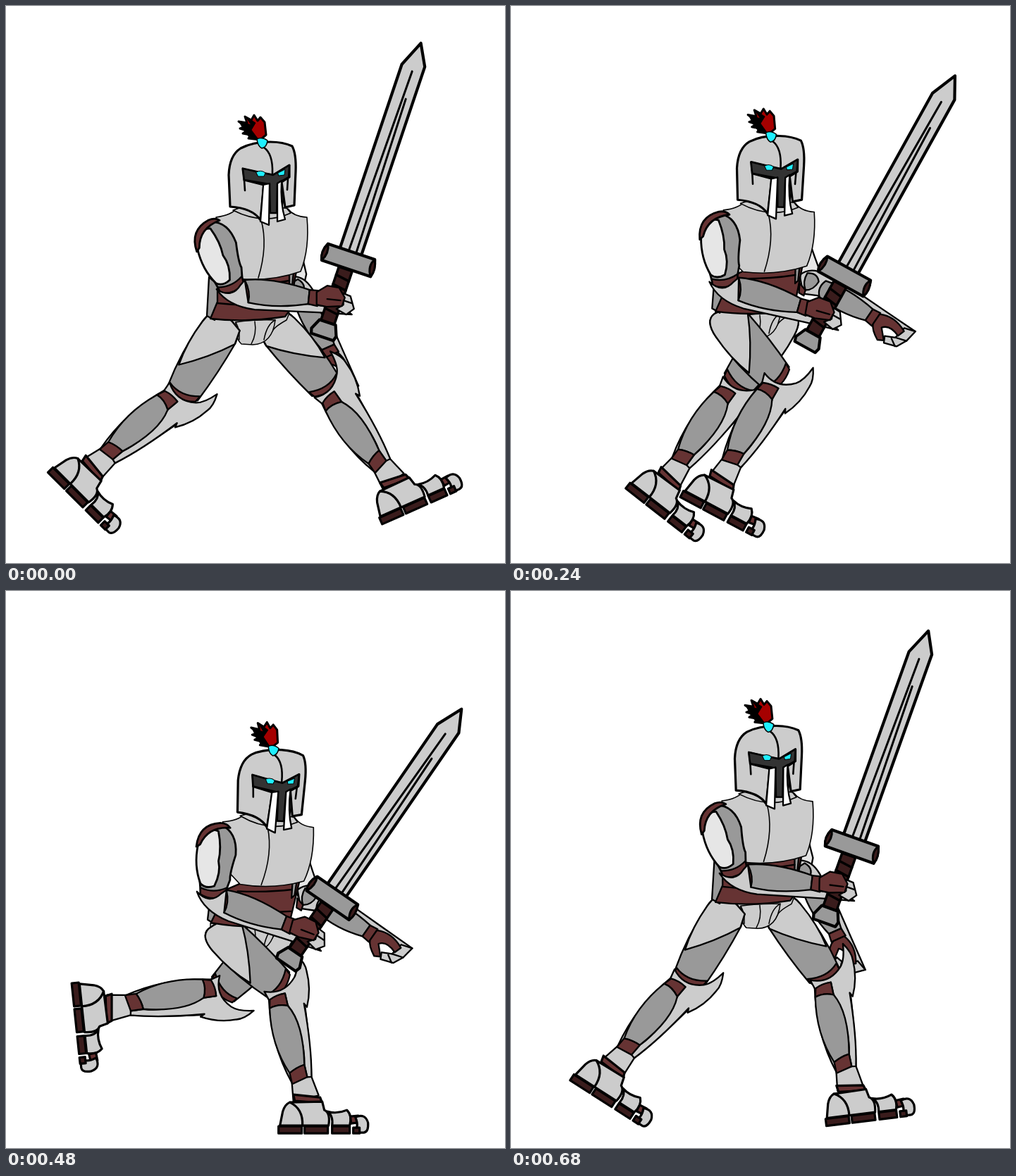
Write an HTML page with a canvas that moves like this. It is 708 px wide and 791 px high and loops after 720 ms.

```html
<!DOCTYPE html>
<html lang="en">
<head>
<meta charset="utf-8">
<title>Running knight</title>
<style>
html, body { margin: 0; width: 100%; height: 100%; overflow: hidden; background: #fff; }
canvas { display: block; }
</style>
</head>
<body>
<canvas id="stage" width="708" height="791"></canvas>
<script>
const ctx = document.getElementById('stage').getContext('2d');
const STEEL = '#ccc', GRAY = '#999', PALE = '#e6e6e6', RED = '#633', DARK = '#3a1c1c', CYAN = '#1fefff';
const THIGH = 115, SHIN = 167, UPPER_ARM = 88, BACK_ARM = 76;

// A shape is [fill, path, line width].
const shape = (fill, d, width = 2.3) => ({ fill, path: new Path2D(d), width });

const thigh = [
  shape(GRAY, 'M-27 8Q-24-19-8-18Q10-14 25-8L29 10Q30 60 25 108Q0 122-22 112Q-31 60-27 8Z'),
  shape(RED, 'M-22 106Q0 116 25 101L23 111Q0 125-21 115Z'),
  shape(STEEL, 'M-27 8Q-24-19-8-18Q10-14 25-8L29 12Q8 46-24 78Q-31 45-27 8Z')
];
const shin = [
  shape(STEEL, 'M-20 10L4 6L28 28Q22 90 14 132L18 160L-19 161L-15 134Q-32 75-20 10Z'),
  shape(STEEL, 'M-24-1Q2 10 22-11Q30-20 32-42Q42-27 41-16Q42 10 30 34L27 28Q24 90 14 132L8 131L8 113Q18 75 4 25L4 8Q-10 8-20 13Z'),
  shape(RED, 'M-19 12Q-8 7 4 8L4 26Q-10 20-22 24Z'),
  shape(GRAY, 'M-22 24Q-10 20 4 26Q20 55 8 113Q-4 114-15 120Q-32 75-22 24Z'),
  shape(RED, 'M-15 120Q-4 114 8 113L8 131L-15 136Z')
];
const foot = [
  shape(RED, 'M-20-12L18-8L21 0L-18-3Z', 3.2),
  shape(STEEL, 'M-25-1L21-2L24 10Q33 14 30 32L-8 32Z', 3.2),
  shape(STEEL, 'M-39 32L-35 12Q-32 2-25-1Q-6 8-7 32Z', 3.2),
  shape(STEEL, 'M35 32Q37 18 28 12Q42 16 56 10Q64 18 60 32Z', 3.2),
  shape(RED, 'M61 19L72 18L70 28L62 29Z', 3.2),
  shape(STEEL, 'M66 42Q74 34 68 20Q82 14 86 28Q87 41 80 42Z', 3.2),
  shape(DARK, 'M-41 33H-8V43H-41ZM-4 33H29V43H-4ZM35 33H60V43H35ZM65 35H74V43H65Z', 3.2)
];
const pelvis = [
  shape(STEEL, 'M290 441L402 436L398 446Q380 456 378 462Q368 480 350 480L334 479Q326 472 326 462Q308 450 290 447Z', 1.5),
  shape(STEEL, 'M326 449Q352 445 382 446Q378 480 350 481L334 480Q325 472 326 449Z', 1.5),
  shape(null, 'M353 448Q356 466 348 480M326 449Q332 460 331 474M382 446Q370 452 366 474', 1.5)
];
const torso = [
  shape(GRAY, 'M288 385L306 400L299 432L296 446L285 440Z'),
  shape(RED, 'M300 400L330 385L412 376L402 433L396 441Q340 450 290 444L300 420Z'),
  shape(GRAY, 'M402 378L408 377L406 398L402 402Z'),
  shape(null, 'M300 422Q350 428 402 421M325 397Q370 396 402 390'),
  shape(STEEL, 'M298 300Q320 297 328 287Q362 304 400 288Q408 299 427 300Q431 345 418 377Q375 392 328 387L310 370Z', 1.6),
  shape(null, 'M362 304Q372 340 358 386', 1.6),
  shape(STEEL, 'M322 290L340 284L398 287L404 294Q365 312 322 290Z', 1.6)
];
const head = [
  shape('#a50000', 'M361 190L369 183L367 165L361 158L357 163L352 155L348 162L339 157L342 166L330 164L340 171L332 174L342 177L336 181L347 183L344 188Z', 3),
  shape('#000', 'M331 164L348 169L340 157L354 166L348 176L357 188L346 187L339 179Z', 1),
  shape('#333', 'M336 231H402L390 294H368Z', 2),
  shape(STEEL, 'M318 285L316 240Q317 212 333 202Q350 193 375 193Q393 193 406 199Q412 210 411 235L409 283L396 286L391 250L402 243L402 226L379 240Q357 236 336 231L338 247L366 254L361 304Q350 287 318 285Z', 3.2),
  shape('#333', 'M336 231Q357 236 379 240L402 226L401 243L385 252L384 294H375L374 253L338 247Z'),
  shape('#fff', 'M365 254L374 252L373 311L361 306Z'),
  shape('#fff', 'M385 252L391 248Q389 280 396 303L385 306Z'),
  shape(null, 'M366 201Q379 210 378 238M338 247L339 262M400 245L399 261', 2.6),
  shape(CYAN, 'M355 236Q362 232 368 237L366 242H358ZM386 237L396 232L395 240L387 241Z', 1),
  shape(CYAN, 'M356 189Q363 185 371 191Q370 201 363 202Q357 199 356 189Z', 1.5)
];
const upperArm = [
  shape(GRAY, 'M-28 10Q-22-16-2-17Q22-10 24 22Q19 50 21 58L16 80Q0 90-18 82Q-20 70-28 40Z', 2.8),
  shape(PALE, 'M-26 0Q-18-12-5-8Q3 15 1 34Q7 50 0 70Q-12 76-20 69Q-33 45-31 15Z', 2.8),
  shape(RED, 'M-33 18Q-34-14-4-20Q6-21 11-15Q-20-13-28 14Z', 2.8),
  shape(RED, 'M-19 75Q0 81 18 70L17 81Q0 92-18 84Z')
];
const forearm = [
  shape(STEEL, 'M-24-4Q-8 20 30 25L120 29L168 32L158 24L106 17L21 15L16-17L10-10Q-2 10-24-4Z'),
  shape(GRAY, 'M16-17Q55-21 108-3L106 17Q60 24 21 15Q25 0 16-17Z'),
  shape(RED, 'M108-3L120-2L119 20L106 17Z')
];
const hand = [
  shape(STEEL, 'M156 2L166 6L171 24L160 32L146 24L156 18Z'),
  shape(RED, 'M118 0L133-9L150-6L158 8L154 20L132 21L118 18Z'),
  shape(null, 'M133 10L152 12M156 12L168 16')
];
const sword = [
  shape(STEEL, 'M-17-60V-345L-1-382L15-352V-60Z', 4.2),
  shape(null, 'M0-340L-4-72M4-300L7-72', 3),
  shape(DARK, 'M-10-44H10V38H-10Z', 3.5),
  shape(null, 'M-10-32L10-29M-10-18L10-15M-10 18L10 21', 3.5),
  shape(GRAY, 'M-35-70H35Q40-57 37-45H-36Q-41-58-35-70Z', 4.2),
  shape(DARK, 'M-35-70Q-29-58-36-45Q-42-56-35-70ZM35-70Q28-58 37-45Q42-56 35-70Z', 3),
  shape(GRAY, 'M-12 36H12L18 51L16 58H-17L-19 51Z', 4.2)
];
const backUpper = [
  shape(PALE, 'M-14-8H6Q10 30 15 60L8 84L-14 76Z')
];
const backForearm = [
  shape(STEEL, 'M-16 2Q-10-16 14-18L60-20L112-17L166-14L150-4L108 2L20 14L2 22Z'),
  shape(GRAY, 'M20-10Q55-18 98-10L97 9Q60 20 24 14Q14 4 20-10Z'),
  shape(GRAY, 'M-8-6Q4-14 12-4Q12 10 2 16Q-8 8-8-6Z'),
  shape(RED, 'M-10 12L2 16L4 24L-4 24Z'),
  shape(RED, 'M98-10L110-11L109 11L97 9Z'),
  shape(STEEL, 'M150-10L166-14L162 4L154 18L136 23L132 14L146 8Z'),
  shape(RED, 'M110-9Q130-18 152-6L148 4Q130-4 122 6L134 20L126 24Q112 16 109 8Z'),
  shape(null, 'M146 8L162 4M142 12L152 19')
];

// Six evenly spaced poses, linear in between. Angles are absolute degrees.
const KEYS = {
  bob: [0, 27, -9, 1, 31, -5],
  lean: [0, 3.8, 1.2, 0.5, 3.5, 1.2],
  thighA: [31, 37, -40, -47, -47, 26],
  shinA: [50, 85, 30, -43, -13, 21],
  footA: [45, 98, 28, -41, 0, 8],
  thighB: [-40, -40, 34, 32, 43, -22],
  shinB: [-35, -11, 36, 53, 82, 34],
  footB: [-24, -16, 38, 63, 84, 27],
  upper: [-17, -6, -3, -2, 8, -9],
  fore: [0, 14, 10, 8, 15, 3],
  sword: [18.6, 32, 29, 26.3, 34.5, 21.8],
  backUpper: [-4, -8, -11, -11, -10, -8],
  backFore: [63, 70, 31, 27, 32, 63]
};
const STEP = 40, STEPS = 18, PER_KEY = 3;

function poseAt(step) {
  const i = Math.floor(step / PER_KEY), f = step % PER_KEY / PER_KEY, pose = {};
  for (const [name, v] of Object.entries(KEYS)) pose[name] = v[i] + (v[(i + 1) % v.length] - v[i]) * f;
  return pose;
}

// Point at local (x, y) of a part that stands at p, turned by deg.
function along([px, py], deg, x, y) {
  const a = deg * Math.PI / 180, c = Math.cos(a), s = Math.sin(a);
  return [px + x * c - y * s, py + x * s + y * c];
}

function draw(shapes, [x, y], deg, { pivot = [0, 0], flip = 1 } = {}) {
  ctx.save();
  ctx.translate(x, y);
  ctx.rotate(deg * Math.PI / 180);
  ctx.scale(flip, 1);
  ctx.translate(-pivot[0], -pivot[1]);
  for (const { fill, path, width } of shapes) {
    if (fill) {
      ctx.fillStyle = fill;
      ctx.fill(path);
    }
    ctx.lineWidth = width;
    ctx.stroke(path);
  }
  ctx.restore();
}

function drawLeg(hip, thighDeg, shinDeg, footDeg, flip) {
  const knee = along(hip, thighDeg, 0, THIGH), ankle = along(knee, shinDeg, 0, SHIN);
  draw(thigh, hip, thighDeg, { flip });
  draw(shin, knee, shinDeg);
  draw(foot, ankle, footDeg);
}

function drawKnight(p) {
  const pivot = [355, 455], hips = [355, 455 + p.bob];
  const shoulder = along(hips, p.lean, -58, -133), elbow = along(shoulder, p.upper, 0, UPPER_ARM);
  const grip = along(elbow, p.fore, 145, 9);
  const backShoulder = along(hips, p.lean, 52, -133), backElbow = along(backShoulder, p.backUpper, 0, BACK_ARM);

  draw(backUpper, backShoulder, p.backUpper);
  draw(backForearm, backElbow, p.backFore);
  drawLeg([384, hips[1]], p.thighB, p.shinB, p.footB, -1);
  draw(pelvis, hips, 0, { pivot });
  drawLeg([306, hips[1]], p.thighA, p.shinA, p.footA, 1);
  draw(torso, hips, p.lean, { pivot });
  draw(head, hips, p.lean, { pivot });
  draw(upperArm, shoulder, p.upper);
  draw(forearm, elbow, p.fore);
  draw(sword, grip, p.sword);
  draw(hand, elbow, p.fore);
}

function frame() {
  ctx.fillStyle = '#fff';
  ctx.fillRect(0, 0, 708, 791);
  ctx.strokeStyle = '#000';
  ctx.lineJoin = ctx.lineCap = 'round';
  drawKnight(poseAt(Math.floor(performance.now() / STEP) % STEPS));
  requestAnimationFrame(frame);
}
frame();
</script>
</body>
</html>
```
